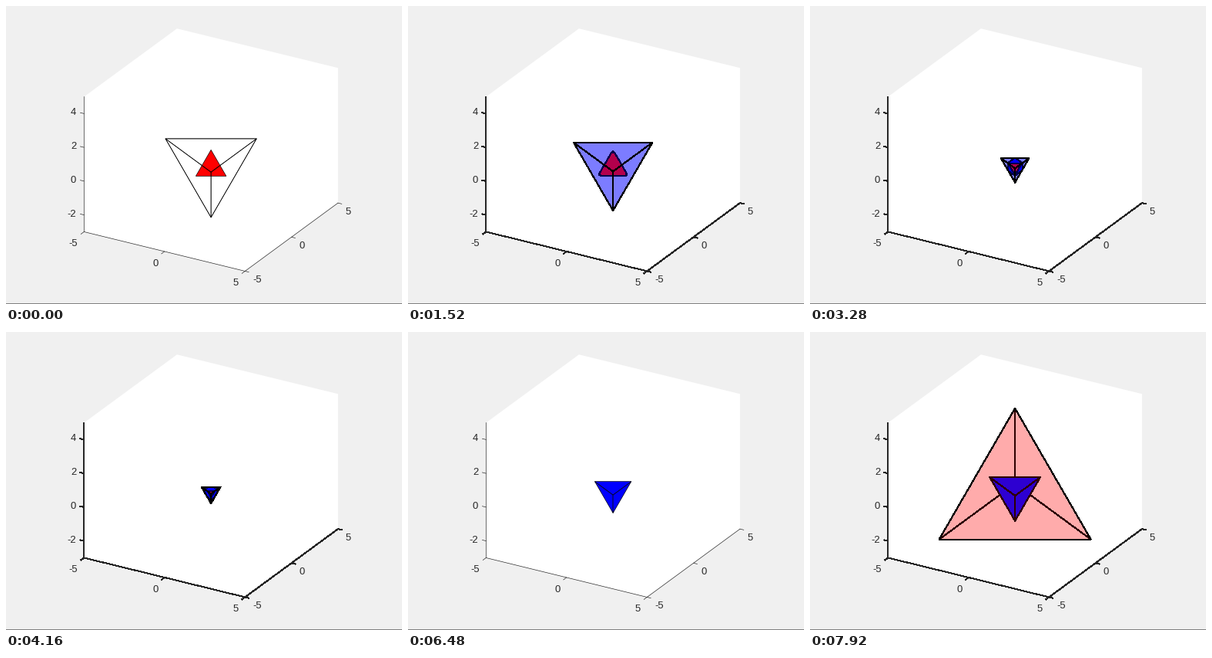
A matplotlib script that plays this animation: 514x386 px, repeating every 8 s.

```python
import numpy as np
import matplotlib.pyplot as plt
from matplotlib.animation import FuncAnimation
from matplotlib.collections import PolyCollection

W, H, DPI = 514, 386, 100
PX = 72 / DPI                 # one pixel in points
UNIT = 24.13                  # pixels per data unit
CENTER = np.array([265.6, 207.7])
INK = "#262626"
RED, BLUE = (1, 0, 0), (0, 0, 1)

# Orthographic camera
az, el = np.radians(30), np.radians(25)
RIGHT = np.array([np.cos(az), np.sin(az), 0])
UP = np.array([-np.sin(az) * np.sin(el), np.cos(az) * np.sin(el), np.cos(el)])
EYE = np.cross(RIGHT, UP)

# Unit tetrahedron; its mirror image is the dual
ring = np.radians([0, 120, 240])
rad = np.sqrt(8) / 3
TETRA = np.array([[0, 0, 1]] + [[rad * np.cos(a), rad * np.sin(a), -1 / 3] for a in ring])
DUAL = -TETRA


def project(p):
    p = np.asarray(p, float)
    return CENTER + UNIT * np.stack([p @ RIGHT, -(p @ UP)], axis=-1)


def faces(tetra, size):
    """Pairs of (outward normal, triangle), far faces first."""
    out = [(-v, size * np.delete(tetra, i, axis=0)) for i, v in enumerate(tetra)]
    return sorted(out, key=lambda f: f[0] @ EYE)


def clip(poly, normal, limit):
    """Part of a polygon where normal . p <= limit."""
    out = []
    for p, q in zip(poly, np.roll(poly, -1, axis=0)):
        a, b = normal @ p - limit, normal @ q - limit
        if a <= 1e-9:
            out.append(p)
        if (a < -1e-9 and b > 1e-9) or (a > 1e-9 and b < -1e-9):
            out.append(p + (q - p) * a / (a - b))
    return np.array(out).reshape(-1, 3)


def core(red_size, blue_size):
    """Visible faces of the solid shared by both tetrahedra."""
    out = []
    for tetra, size, other, cut, color in (
            (TETRA, red_size, DUAL, blue_size, RED),
            (DUAL, blue_size, TETRA, red_size, BLUE)):
        for normal, poly in faces(tetra, size):
            if normal @ EYE <= 0:
                continue
            for v in other:
                poly = clip(poly, -v, cut / 3)
            if len(poly) > 2 and np.ptp(poly, axis=0).max() > 1e-6:
                out.append((poly, color + (1,)))
    return out


def shell(tetra, size, color, alpha, inner):
    """Inner faces wrapped between the far and near faces of a glassy shell."""
    back, front = [], []
    for normal, poly in faces(tetra, size):
        (front if normal @ EYE > 0 else back).append((poly, color + (alpha,)))
    return back + inner + front


def scene(n):
    step = n - (n + 2) // 5          # every fifth tick is a pause
    if step <= 51:
        i = max(step - 11, 0)
        size = 3 - 0.1 * i if i <= 20 else 1 - (i - 20) / 30
        alpha = 0.03 * min(step, 10)
        return shell(DUAL, size, BLUE, alpha, core(1, size))
    size = 1 / 3 + min(step - 52, 20) / 15
    solid = core(5, size)
    if step < 73:
        return solid
    return shell(TETRA, 5, RED, 0.03 * (step - 73), solid)


fig = plt.figure(figsize=(W / DPI, H / DPI), dpi=DPI, facecolor="#f0f0f0")
ax = fig.add_axes([0, 0, 1, 1])
ax.set_xlim(-0.5, W - 0.5)
ax.set_ylim(H - 0.5, -0.5)
ax.axis("off")


def line(a, b):
    ax.plot([a[0], b[0]], [a[1], b[1]], color=INK, snap=False, zorder=2)


def tick(point, along, value, offset, align):
    p = project(point)
    d = project(along) - project([0, 0, 0])
    line(p, p + 5 * d / np.hypot(*d))
    ax.text(p[0] + offset[0], p[1] + offset[1], str(value), color=INK, ha=align,
            va="center", family="Liberation Sans", fontsize=13 * PX)


box = [(-5, -5, 5), (-5, 5, 5), (5, 5, 5), (5, 5, -3), (5, -5, -3), (-5, -5, -3)]
ax.fill(*project(box).T, color="white", lw=0, zorder=1)
for a, b in ((0, 5), (5, 4), (4, 3)):
    line(project(box[a]), project(box[b]))
for v in (-5, 0, 5):
    tick((v, -5, -3), (0, -1, 0), v, (-8.4, 15.8), "right")
    tick((5, v, -3), (1, 0, 0), v, (9.7, 11.8), "left")
for v in (-2, 0, 2, 4):
    tick((-5, -5, v), (-1, 0, 0), v, (-10.1, -1), "right")
ax.axhspan(H - 1.5, H - 0.5, color="#808080", lw=0)

shapes = PolyCollection([], edgecolors="black", joinstyle="round", snap=False, zorder=3)
ax.add_collection(shapes, autolim=False)


def draw(n):
    parts = scene(n)
    shapes.set_verts([project(poly) for poly, _ in parts])
    shapes.set_facecolor([color for _, color in parts])
    # Lines are thin and smooth until something is translucent, then hard-edged
    smooth = not any(0 < color[3] < 1 for _, color in parts)
    for art in (shapes, *ax.lines):
        art.set_antialiased(smooth)
        art.set_linewidth((0.67 if smooth else 1) * PX)
    return [shapes]


anim = FuncAnimation(fig, draw, frames=100, interval=80, repeat=True, repeat_delay=0)
plt.show()
```
